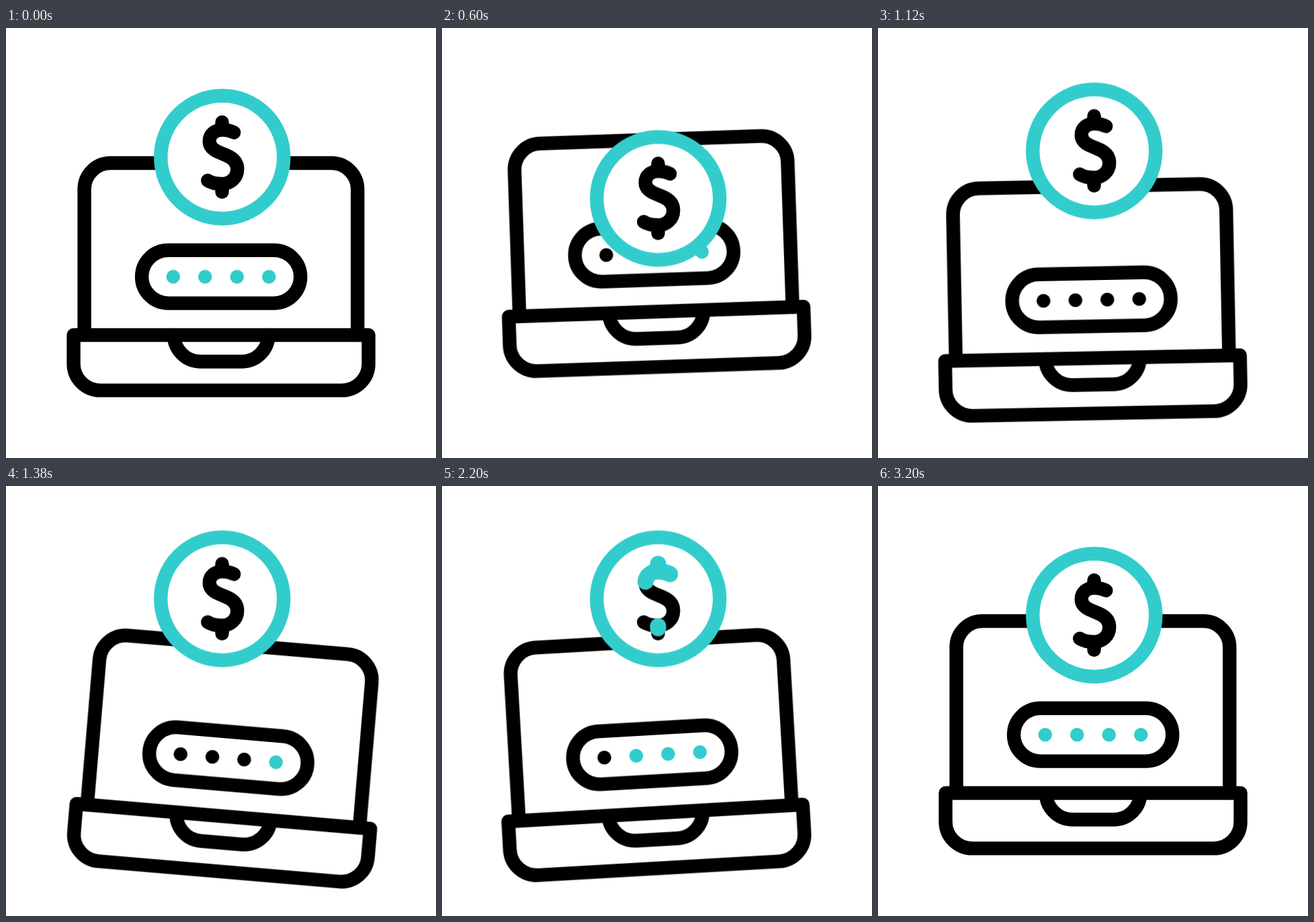
Animation of 640x640 px, one loop 3.6 s. Source, as an HTML page:

```html
<!DOCTYPE html>
<html lang="en">
<head>
<meta charset="utf-8">
<title>Online payment</title>
<style>
html, body { margin: 0; width: 100%; height: 100%; overflow: hidden; background: #fff; }
svg {
  display: block; width: 100%; height: 100%;
  fill: none; stroke-width: 20.4; stroke-linecap: round; stroke-linejoin: round;
  --accent: #33cccc;
}
.lift, .tilt, .coin, .glow path { animation: 3.6s cubic-bezier(.333, 0, .667, 1) infinite; }
.lift { animation-name: lift; }
.tilt { animation-name: tilt; transform-origin: 320px 498px; }
.coin { animation-name: coin; }
.ink { stroke: #000; }
.ring { stroke: var(--accent); fill: #fff; }
.glow { stroke: var(--accent); stroke-width: 24; }
.glow path { stroke-dasharray: 1 2; stroke-dashoffset: 1.05; animation-name: glow; }
.dots { fill: var(--accent); }
.dots circle { animation: 3.6s step-end infinite; }
.dots :nth-child(1) { animation-name: dot1; }
.dots :nth-child(2) { animation-name: dot2; }
.dots :nth-child(3) { animation-name: dot3; }
.dots :nth-child(4) { animation-name: dot4; }

@keyframes lift {
  0%, 5.556%, 72.222%, 100% { transform: translateY(0); }
  15.556% { transform: translateY(-36px); }
  30.278%, 57.778% { transform: translateY(34.4px); }
}
@keyframes tilt {
  0%, 10.556%, 72.222%, 100% { transform: rotate(0deg); }
  25%, 53.889% { transform: rotate(-5deg); }
  39.444% { transform: rotate(5deg); }
}
@keyframes coin {
  0%, 5.556%, 88.889%, 100% { transform: translateY(0); }
  13.889% { transform: translateY(65px); }
  37.222%, 75% { transform: translateY(-24.4px); }
}
@keyframes glow {
  0%, 56.667%, 86.111%, 100% { stroke-dashoffset: 1.05; }
  68.889%, 76.667% { stroke-dashoffset: 0; }
}
/* Dots darken left to right and light up right to left, twice per loop. */
@keyframes dot1 {
  0%, 50%, 87.222% { fill: var(--accent); }
  8.889%, 58.889% { fill: #000; }
}
@keyframes dot2 {
  0%, 45.556%, 83.333% { fill: var(--accent); }
  13.333%, 63.333% { fill: #000; }
}
@keyframes dot3 {
  0%, 41.111%, 79.444% { fill: var(--accent); }
  17.778%, 67.778% { fill: #000; }
}
@keyframes dot4 {
  0%, 36.667%, 75.556% { fill: var(--accent); }
  22.222%, 72.222% { fill: #000; }
}
</style>
</head>
<body>
<svg viewBox="0 0 640 640">
  <defs>
    <path id="bar-top" pathLength="1" d="M321.6 140.3V151"/>
    <path id="bar-bottom" pathLength="1" d="M321.6 233V244"/>
    <path id="ess" pathLength="1" d="M339.3 155.5C334 152.8 328 151.6 322 151.6C311 151.6 302.8 158.5 302.8 168.5C302.8 176 308 181 316 184.5L329 190C338 194 344.3 200 344.3 210C344.3 223 334 232 321.5 232C313 232 306 230.8 300.3 227"/>
  </defs>
  <g class="lift">
    <g class="tilt">
      <g class="ink">
        <path d="M116.6 457V240a39 39 0 0 1 39-39H484.3a39 39 0 0 1 39 39V457"/>
        <path d="M100.6 457H539.6V499.7a39.7 39.7 0 0 1-39.7 39.7H140.3a39.7 39.7 0 0 1-39.7-39.7Z"/>
        <path d="M250 457a40 39.5 0 0 0 40 39.5H350.5a40 39.5 0 0 0 40-39.5"/>
        <rect x="202.1" y="330.8" width="236.2" height="78.8" rx="39.4"/>
      </g>
      <g class="dots">
        <circle cx="248.8" cy="370.2" r="10.3"/>
        <circle cx="296.3" cy="370.2" r="10.3"/>
        <circle cx="343.8" cy="370.2" r="10.3"/>
        <circle cx="391.3" cy="370.2" r="10.3"/>
      </g>
    </g>
  </g>
  <g class="coin">
    <circle class="ring" cx="321.8" cy="192.2" r="91.5"/>
    <g class="ink">
      <use href="#bar-top"/>
      <use href="#ess"/>
      <use href="#bar-bottom"/>
    </g>
    <g class="glow">
      <path pathLength="1" d="M321.6 140.3V151"/>
      <path pathLength="1" d="M339.3 155.5C334 152.8 328 151.6 322 151.6C311 151.6 302.8 158.5 302.8 168.5C302.8 176 308 181 316 184.5L329 190C338 194 344.3 200 344.3 210C344.3 223 334 232 321.5 232C313 232 306 230.8 300.3 227"/>
      <path pathLength="1" d="M321.6 233V244"/>
    </g>
  </g>
</svg>
</body>
</html>
```
